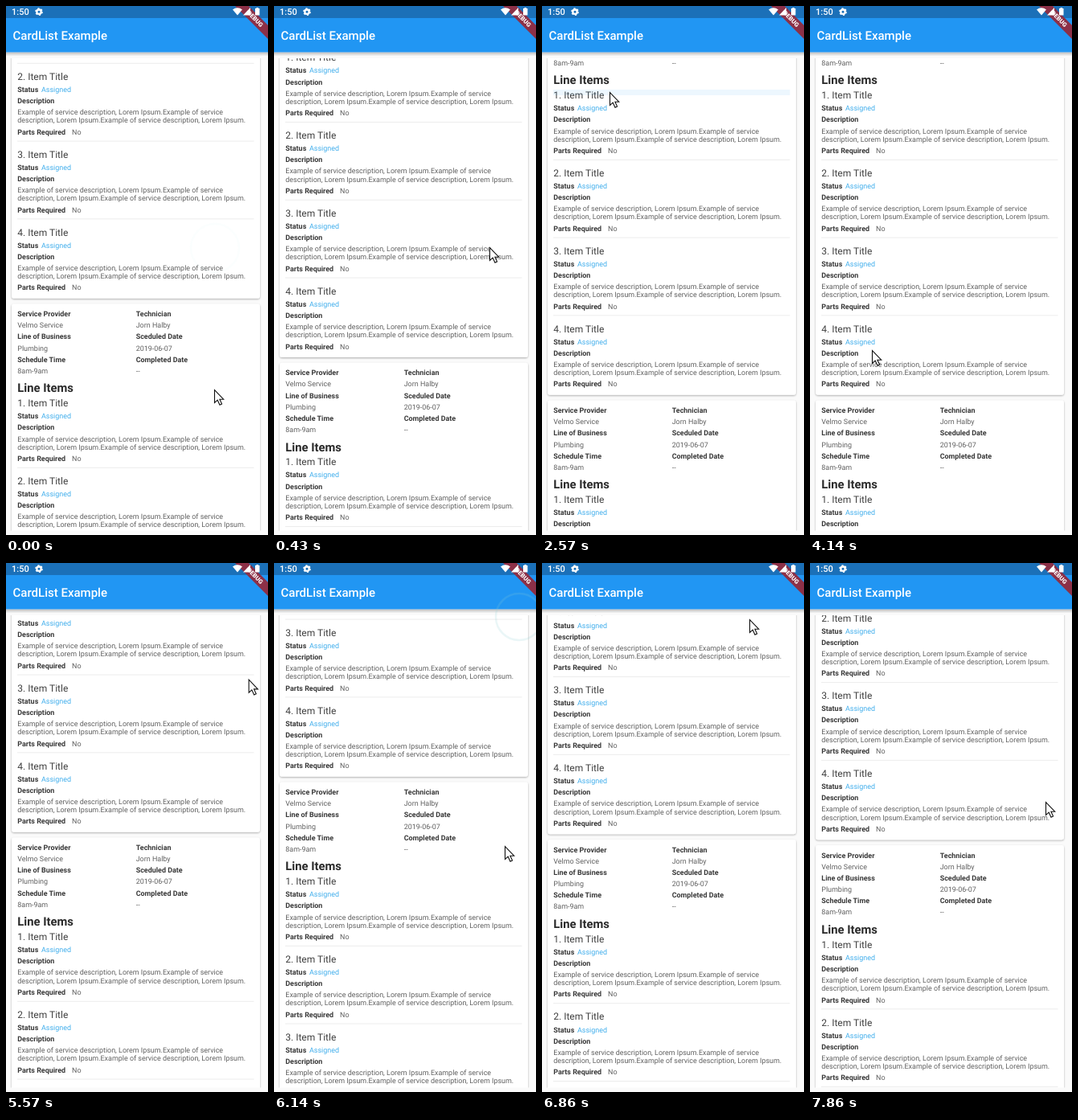
An HTML page for the animation above (8000 ms loop, 326 by 658 pixels).

```html
<!DOCTYPE html>
<html lang="en">
<head>
<meta charset="utf-8">
<title>CardList Example</title>
<style>
html, body { margin: 0; width: 100%; height: 100%; overflow: hidden; background: #fafafa; }
svg { display: block; width: 326px; height: 658px; font: 8.95px Roboto, sans-serif; text-rendering: geometricPrecision; }
.label { font-weight: 700; fill: #383838; }
.value { fill: #606060; }
.link { fill: #41aeec; }
.item { font-size: 12px; fill: #404040; }
.heading { font-size: 14.8px; font-weight: 700; fill: #2a2a2a; }
</style>
</head>
<body>
<svg viewBox="0 0 326 658">
  <defs>
    <clipPath id="viewport"><rect y="65" width="326" height="587.5"/></clipPath>
    <filter id="cardShadow" x="-5%" y="-5%" width="110%" height="110%">
      <feDropShadow dx="0" dy="1" stdDeviation="0.9" flood-opacity=".32"/>
    </filter>
    <linearGradient id="barShadow" x2="0" y2="1">
      <stop stop-color="#000" stop-opacity=".24"/>
      <stop offset="1" stop-color="#000" stop-opacity="0"/>
    </linearGradient>
  </defs>
  <rect width="326" height="658" fill="#fafafa"/>
  <g clip-path="url(#viewport)">
    <g id="list"></g>
  </g>
  <rect id="ink" x="14" width="294.5" fill="#2196f3"/>
  <rect y="57.5" width="326" height="5" fill="url(#barShadow)"/>
  <rect width="326" height="57.5" fill="#2196f3"/>
  <rect width="326" height="15" fill="#1b70b8"/>
  <text x="8.5" y="42.3" font-size="15" font-weight="500" fill="#fff">CardList Example</text>
  <g transform="translate(326 0) rotate(45)">
    <rect x="-32" y="17" width="64" height="12" fill="#8c3047"/>
    <text y="25.4" font-size="7.6" font-weight="900" fill="#fff" text-anchor="middle">DEBUG</text>
  </g>
  <g fill="#fff">
    <text x="7" y="11" font-size="11" font-weight="500">1:50</text>
    <circle cx="41" cy="7.2" r="2.7" fill="none" stroke="#fff" stroke-width="2.3"/>
    <circle cx="41" cy="7.2" r="4.1" fill="none" stroke="#fff" stroke-width="1.6" stroke-dasharray="2.1 2.19"/>
    <path d="M282 4.5Q288 0 294 4.5L288 11.5Z"/>
    <path d="M304 2V11.5H295Z"/>
    <path d="M310 3H311.5V2H314V3H315.5V11.5H310Z"/>
  </g>
  <circle id="ring" fill="none" stroke="#8ccbd4" stroke-width="2.5"/>
  <circle id="dot" cx="182" cy="143" r="2.5" fill="#4db6e8"/>
  <path id="cursor" d="M.5 .5V16.5L4.2 13.2L7 19.3L9.6 18.1L6.9 12.2H11.7Z" fill="#fff" stroke="#111" stroke-width="1.1"/>
</svg>
<script>
const LOOP = 8000, STEP = 1000 / 7;
const CARD_PITCH = 503, ITEM_PITCH = 96.8;
const byId = id => document.getElementById(id);
const [list, ink, ring, dot, cursor] = ['list', 'ink', 'ring', 'dot', 'cursor'].map(byId);

const text = (cls, x, y, s) => `<text class="${cls}" x="${x}" y="${y}">${s}</text>`;

const fields = [
  ['Service Provider', 'Velmo Service', 'Technician', 'Jorn Halby'],
  ['Line of Business', 'Plumbing', 'Sceduled Date', '2019-06-07'],
  ['Schedule Time', '8am-9am', 'Completed Date', '--']
];

const fieldRow = ([a, b, c, d], i) => {
  const y = 3.2 + i * 28.2;
  return text('label', 14.3, y, a) + text('value', 14.3, y + 14.1, b) +
    text('label', 161.7, y, c) + text('value', 161.7, y + 14.1, d);
};

const item = i => `<g transform="translate(0 ${111 + i * ITEM_PITCH})">` +
  text('item', 14.3, 4.2, `${i + 1}. Item Title`) +
  text('label', 14.3, 19.3, 'Status') + text('link', 44, 19.3, 'Assigned') +
  text('label', 14.3, 33.4, 'Description') +
  text('value', 14.3, 47.5, 'Example of service description, Lorem Ipsum.Example of service') +
  text('value', 14.3, 57.7, 'description, Lorem Ipsum.Example of service description, Lorem Ipsum.') +
  text('label', 14.3, 72, 'Parts Required') + text('value', 82, 72, 'No') +
  (i < 3 ? '<path d="M14 80.3H308.5" stroke="#ececec"/>' : '') + '</g>';

const card = i => `<g transform="translate(0 ${(i - 1) * CARD_PITCH})">
  <rect x="7" y="-12.5" width="309" height="496.3" rx="3" fill="#fff" filter="url(#cardShadow)"/>` +
  fields.map(fieldRow).join('') + text('heading', 14.3, 97.4, 'Line Items') +
  [0, 1, 2, 3].map(item).join('') + '</g>';

list.innerHTML = card(0) + card(1);

// Pointer path: step, x, y
const path = [
  [0, 259, 477], [3, 268, 300], [6, 305, 2], [9, 262, 89], [10, 262, 89],
  [13, 182, 143], [15, 112, 430], [16, 104, 400], [18, 84, 107], [21, 225, 160],
  [24, 70, 180], [26, 80, 78], [27, 68, 230], [29, 77, 428], [31, 130, 300],
  [34, 205, 34], [37, 295, 300], [40, 305, 67], [42, 295, 270], [43, 287, 352],
  [46, 240, 170], [48, 258, 70], [50, 260, 150], [51, 255, 40], [53, 275, 560], [55, 293, 297]
];

const clamp = v => Math.max(0, Math.min(1, v));
const smooth = v => v * v * (3 - 2 * v);

function pointer(n) {
  const k = Math.max(1, path.findIndex(p => p[0] >= n));
  const [a, ax, ay] = path[k - 1], [b, bx, by] = path[k];
  const u = (n - a) / (b - a);
  return [ax + (bx - ax) * u, ay + (by - ay) * u];
}

function scrollY(n) {
  if (n < 35) return 503 - 120 * (1 - clamp(n / 8)) ** 2;
  if (n < 43) return 503 - 218 * smooth(clamp((n - 34) / 8));
  return n < 50 ? 363.5 - 78.5 * Math.exp(-(n - 43) * 0.482) : 363.5;
}

function showRing(x, y, r, opacity) {
  ring.setAttribute('cx', x);
  ring.setAttribute('cy', y);
  ring.setAttribute('r', r);
  ring.setAttribute('opacity', opacity);
}

function showInk(y, height, opacity) {
  ink.setAttribute('y', y);
  ink.setAttribute('height', height);
  ink.setAttribute('opacity', opacity);
}

function render(t) {
  const n = Math.min(55, Math.floor((t + 4.4) / STEP));
  list.setAttribute('transform', `translate(0 ${scrollY(n)})`);
  cursor.setAttribute('transform', `translate(${pointer(n)})`);
  cursor.setAttribute('visibility', n > 6 && n < 9 ? 'hidden' : 'visible');
  dot.setAttribute('opacity', n === 13 ? 0.8 : 0);

  if (n === 0) showRing(260, 301, 30, 0.03);
  else if (n > 39 && n < 45) showRing(305, 67, 14 + 5 * (n - 40), 0.09 * (45 - n));
  else showRing(0, 0, 0, 0);

  if (n === 14) showInk(104, 80.5, 0.05);
  else if (n === 16) showInk(394.5, 80.5, 0.05);
  else if (n === 18) showInk(104, 7, 0.08);
  else showInk(0, 0, 0);
}

const start = performance.now();
function tick() {
  render((performance.now() - start) % LOOP);
  requestAnimationFrame(tick);
}
tick();
</script>
</body>
</html>
```
